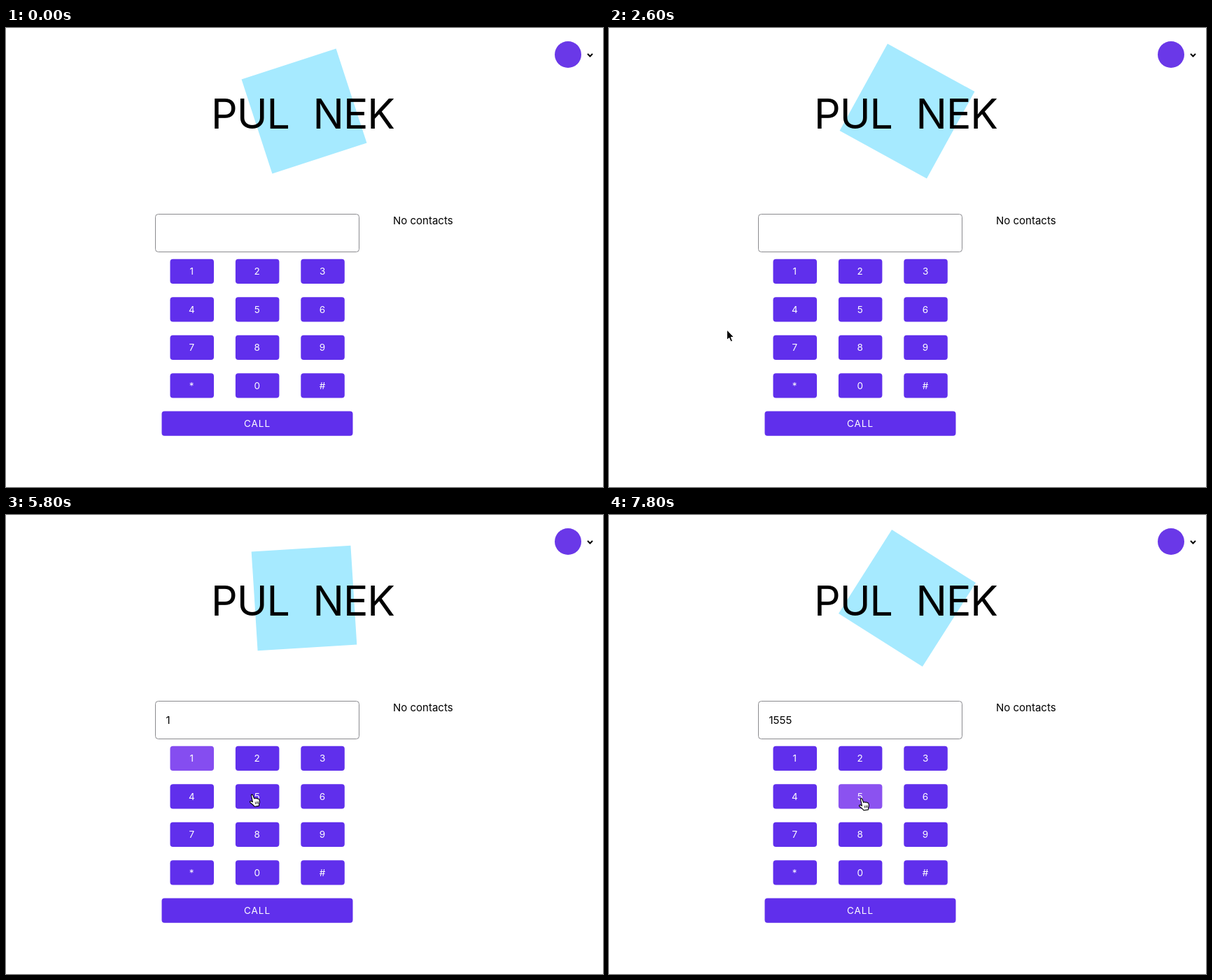
Animation, 853 px wide and 657 px high, one loop 8 s. Source, as an HTML page:

```html
<!DOCTYPE html>
<html lang="en">
<head>
<meta charset="utf-8">
<title>Dialer</title>
<style>
  html, body { margin: 0; width: 100%; height: 100%; overflow: hidden; background: #fff; }
  svg { display: block; width: 100%; height: 100%; font-family: Inter, "Open Sans", sans-serif; }
  .title { font-size: 59px; letter-spacing: -1px; }
  .body { font-size: 15px; }
  .label { font-size: 13.5px; fill: #fff; text-anchor: middle; letter-spacing: 1px; }
</style>
</head>
<body>
<svg viewBox="0 0 853 657">
  <rect id="mark" x="355" y="48" width="142" height="142" fill="#a6eaff"/>
  <text class="title" x="293" y="143.5">PUL</text>
  <text class="title" x="555" y="143.5" text-anchor="end">NEK</text>

  <circle cx="803" cy="38" r="19" fill="#6a38e8"/>
  <path d="M831 37 l3.5 3.5 l3.5 -3.5" fill="none" stroke="#000" stroke-width="2"/>

  <rect x="213.5" y="266.5" width="291" height="54" rx="4" fill="#fff" stroke="#8a8a8e"/>
  <text id="display" class="body" x="228.5" y="299"></text>
  <text class="body" x="553" y="281">No contacts</text>
  <g id="keys"></g>

  <g id="arrow" stroke="#fff" stroke-width="1">
    <path d="M0 0 V14.5 L3.2 11.6 L5.6 17 L8 16 L5.7 10.6 H10 Z"/>
  </g>
  <g id="hand" fill="#fff" stroke="#000" stroke-width="1.1" stroke-linejoin="round">
    <path d="M-1.6 1 Q-.8 -.8 .7 1 L2.7 6 Q4.2 4.6 5.2 6 Q6.8 4.8 7.8 6.4 Q9.6 5.6 9.9 7.8
             Q11 11 9.6 13.6 L9.4 16.4 L3 17.2 Q1 14.6 -3 11.8 Q-4.4 9.4 -1.8 9.6 L.4 10.8 Z"/>
    <path d="M4.2 10.5 l.5 3.5 M6.3 10.2 l.4 3.5 M8.2 10 l.2 3.3" fill="none" stroke-width=".8"/>
  </g>
</svg>
<script>
const LOOP = 8000, STEP = 200;
const KEY = { x: 234.5, y: 330.8, w: 62.5, h: 35.2, dx: 93.4, dy: 54.5 };
const BASE = [96, 47, 236], LIT = [176, 112, 244];
const HOLD = 0.2, FADE = 1.3;
const presses = [[5.1, '1'], [6.2, '5'], [6.7, '5'], [7.2, '5']];

// time in seconds, x, y of the pointer tip
const path = [
  [1, 130, 675], [1.2, 123, 655], [1.6, 112, 620], [2.4, 154, 464], [2.6, 168.5, 432],
  [3.6, 245, 367], [4.4, 298, 367], [4.6, 299.5, 363], [4.8, 274, 351], [5.3, 273, 352],
  [5.8, 352, 400], [6.2, 361, 405.5], [8, 361, 405.5]
];

const el = id => document.getElementById(id);
const mix = (a, b, k) => a + (b - a) * k;

function add(name, attrs, text = '') {
  const node = document.createElementNS('http://www.w3.org/2000/svg', name);
  for (const key in attrs) node.setAttribute(key, attrs[key]);
  node.textContent = text;
  return el('keys').appendChild(node);
}

function addKey(x, y, width, label) {
  const rect = add('rect', { x, y, width, height: KEY.h, rx: 4, fill: `rgb(${BASE})` });
  add('text', { class: 'label', x: x + width / 2, y: y + 22.6 }, label);
  return rect;
}

const keys = {};
[...'123456789*0#'].forEach((label, i) => {
  keys[label] = addKey(KEY.x + i % 3 * KEY.dx, KEY.y + Math.floor(i / 3) * KEY.dy, KEY.w, label);
});
addKey(222.5, 548.6, 273, 'CALL');

function pointerAt(t) {
  const i = path.findIndex(p => p[0] > t);
  if (i < 1) return path[0].slice(1);
  const [a, b] = [path[i - 1], path[i]];
  const k = (t - a[0]) / (b[0] - a[0]);
  return [mix(a[1], b[1], k), mix(a[2], b[2], k)];
}

function overKey(x, y) {
  const dx = x - KEY.x, dy = y - KEY.y;
  return dx > 0 && dy > 0 && dx % KEY.dx < KEY.w && dy % KEY.dy < KEY.h;
}

// Held keys stay lit, then fade back after release.
function glow(label, t) {
  return Math.max(0, ...presses.map(([release, key]) =>
    key !== label || t < release - HOLD ? 0 : Math.min(1, 1 - (t - release) / FADE)));
}

function draw(t) {
  el('mark').setAttribute('transform', `rotate(${18 * t - 18} 426 119)`);
  el('display').textContent = presses.filter(p => p[0] <= t).map(p => p[1]).join('');
  for (const label of ['1', '5']) {
    const k = glow(label, t);
    keys[label].setAttribute('fill', `rgb(${BASE.map((c, i) => Math.round(mix(c, LIT[i], k)))})`);
  }
  const [x, y] = pointerAt(t), hover = overKey(x, y);
  for (const [id, shown] of [['arrow', !hover], ['hand', hover]]) {
    el(id).setAttribute('transform', `translate(${x} ${y})`);
    el(id).style.display = shown ? '' : 'none';
  }
}

const start = performance.now();
function tick() {
  const elapsed = (performance.now() - start) % LOOP;
  draw(Math.floor(elapsed / STEP) * STEP / 1000);
  requestAnimationFrame(tick);
}
tick();
</script>
</body>
</html>
```
